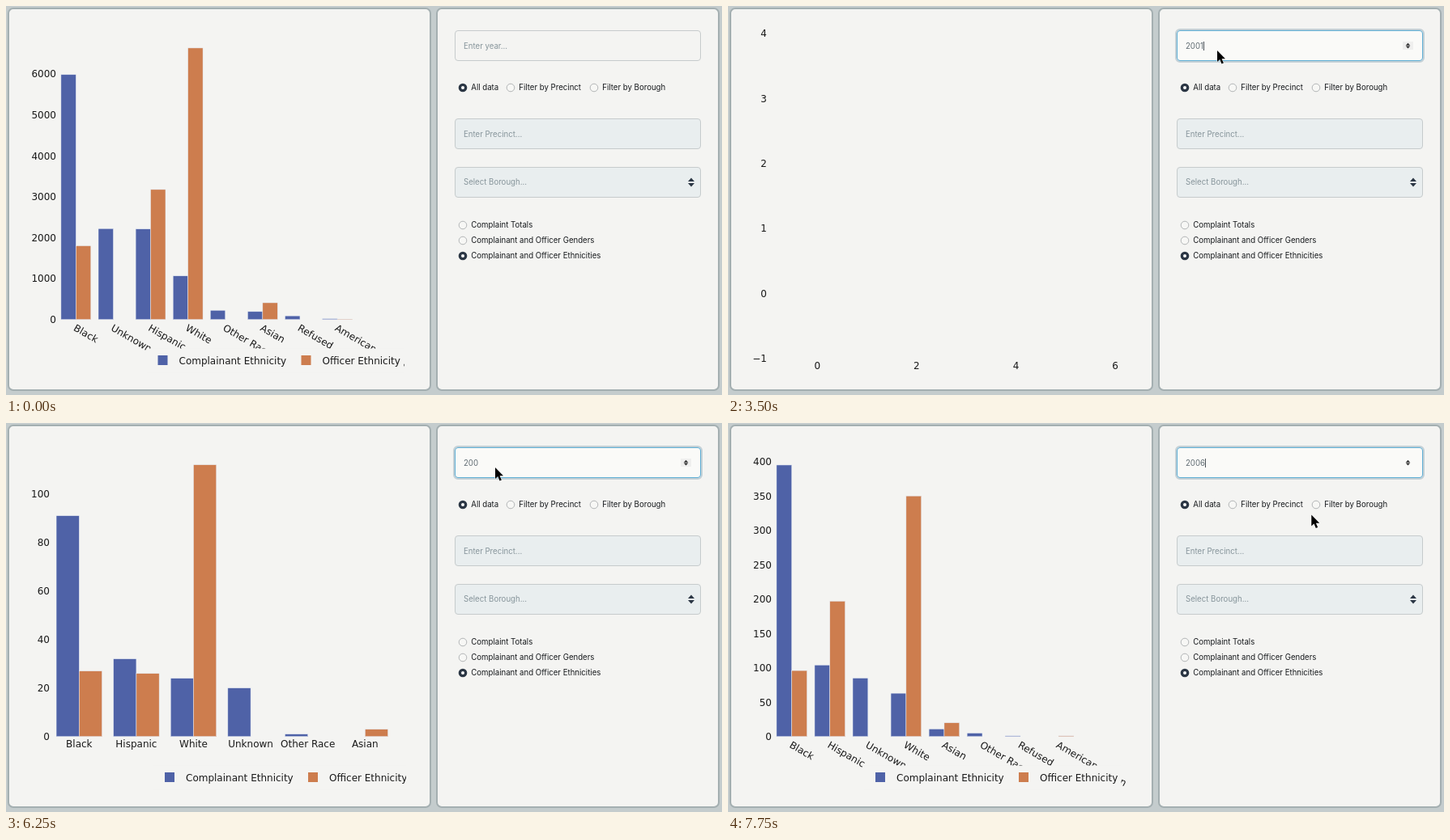
Write an HTML page that moves like this. It is 884 px wide and 481 px high and loops after 8000 ms.

```html
<!DOCTYPE html>
<html lang="en">
<head>
<meta charset="utf-8">
<title>Complaint chart</title>
<style>
  html, body { margin: 0; width: 100%; height: 100%; overflow: hidden; background: #c4cccd; }
  svg { display: block; }
  .panel { fill: #f4f4f2; stroke: #a4afb1; stroke-width: 2; }
  .chart text { font: 12px "DejaVu Sans", Verdana, sans-serif; fill: #1a1a1a; }
  .form text { font: 9.65px Inter, sans-serif; fill: #16191c; }
  .form .hint { fill: #86949a; }
  .form .typed { fill: #5f6b72; }
  .bar { stroke: #e5ecf6; stroke-width: .5; }
  .field { fill: #f4f4f2; stroke: #c6cbcc; }
  .disabled { fill: #e9eeef; }
  .dark { fill: #2b3644; }
</style>
</head>
<body>
<svg id="stage" width="884" height="481" viewBox="0 0 884 481"></svg>
<script>
const BLUE = '#4f62a7', ORANGE = '#cd7d4e', BASE = 387.7;
const stage = document.getElementById('stage');

const rect = (x, y, w, h, attrs = '') => `<rect x="${x}" y="${y}" width="${w}" height="${h}" ${attrs}/>`;
const text = (x, y, label, attrs = '') => `<text x="${x}" y="${y}" ${attrs}>${label}</text>`;
const path = (d, attrs = '') => `<path d="${d}" ${attrs}/>`;
const RIGHT = 'text-anchor="end"', MIDDLE = 'text-anchor="middle"';

function legend(left) {
  const item = (x, color, label) => rect(x + 14, 432, 12, 12, `fill="${color}"`) + text(x + 40, 443, label);
  return rect(left, 423.5, 317.5, 30, 'fill="#f4f4f2"') +
    item(left, BLUE, 'Complainant Ethnicity') + item(left + 177, ORANGE, 'Officer Ethnicity');
}

// Each data row is [category, complainants, officers].
function barChart({ id, left, step, unit, tick, ticks, tickX, legendX, tilted, data }) {
  let out = '';
  for (let i = 0; i <= ticks; i++)
    out += text(tickX, BASE - i * tick * unit + 4.4, i * tick, RIGHT);
  data.forEach(([label, ...values], i) => {
    const center = left + step * (i + .5), width = step * .4;
    values.forEach((value, k) => {
      if (value) out += rect(center + (k - 1) * width, BASE - value * unit, width, value * unit,
        `class="bar" fill="${k ? ORANGE : BLUE}"`);
    });
    out += tilted
      ? text(0, 0, label, `transform="translate(${center - 3.8} 400.5) rotate(30)"`)
      : text(center, 401.2, label, MIDDLE);
  });
  return `<g id="${id}" clip-path="url(#plot)">${out}${legend(legendX)}</g>`;
}

function emptyChart() {
  let out = '';
  for (let v = -1; v <= 4; v++)
    out += text(48, 359.7 - v * 80.4, v < 0 ? '−1' : v, RIGHT);
  for (let v = 0; v <= 6; v += 2)
    out += text(110.3 + v * 61.3, 449, v, MIDDLE);
  return `<g id="empty">${out}</g>`;
}

const radio = (x, y, label, on) =>
  (on ? `<circle cx="${x}" cy="${y}" r="5.3" class="dark"/><circle cx="${x}" cy="${y}" r="2" fill="#fff"/>`
      : `<circle cx="${x}" cy="${y}" r="4.8" fill="#f7f7f5" stroke="#b3b6b7"/>`) +
  text(x + 10.3, y + 3.4, label);

const field = (y, cls = '') => rect(554.5, y + .5, 303, 37, `rx="3.5" class="field ${cls}"`);
const hint = (y, label, id = '') => text(565, y, label, `class="hint" ${id}`);

stage.innerHTML =
  '<clipPath id="plot"><rect x="20" y="20" width="474" height="440"/></clipPath>' +
  rect(3, 3, 521, 472, 'rx="6" class="panel"') + rect(532, 3, 348, 472, 'rx="6" class="panel"') +
  '<g class="chart">' +
  barChart({
    id: 'all', left: 63.3, step: 46.1, unit: .05065, tick: 1000, ticks: 6, tickX: 62, legendX: 173.5, tilted: true,
    data: [['Black', 5980, 1800], ['Unknown', 2220, 0], ['Hispanic', 2210, 3175], ['White', 1065, 6630],
      ['Other Race', 225, 0], ['Asian', 195, 410], ['Refused', 90, 0], ['American Indian', 20, 10]]
  }) +
  barChart({
    id: 'y2001', left: 55, step: 70.6, unit: 3, tick: 20, ticks: 5, tickX: 54, legendX: 182,
    data: [['Black', 91, 27], ['Hispanic', 32, 26], ['White', 24, 112], ['Unknown', 20, 0],
      ['Other Race', 1, 0], ['Asian', 0, 3]]
  }) +
  barChart({
    id: 'y2006', left: 55.2, step: 47.05, unit: .85, tick: 50, ticks: 8, tickX: 54, legendX: 168, tilted: true,
    data: [['Black', 395, 96], ['Hispanic', 104, 197], ['Unknown', 85, 0], ['White', 63, 350],
      ['Asian', 11, 20], ['Other Race', 5, 0], ['Refused', 1, 0], ['American Indian', 0, 1]]
  }) +
  emptyChart() + '</g><g class="form">' +
  field(30) +
  '<g id="focus">' + rect(553, 29, 306, 40, 'rx="5" fill="none" stroke="#c3d0d6" stroke-width="2"') +
  rect(554.5, 30.5, 303, 37, 'rx="3.5" fill="#fafaf8" stroke="#5fafd6"') +
  rect(833, 44, 13, 10, 'id="spinner" fill="#efefee"') +
  path('M836.7 48.7L839.5 45.7L842.3 48.7ZM836.7 49.5L839.5 52.5L842.3 49.5Z', 'fill="#333"') + '</g>' +
  hint(53, 'Enter year...', 'id="yearHint"') + text(565, 53, '', 'id="year" class="typed"') +
  rect(0, 44, 1, 11, 'id="caret" fill="#4a5258"') +
  radio(564, 101, 'All data', true) + radio(623, 101, 'Filter by Precinct') + radio(726, 101, 'Filter by Borough') +
  field(139, 'disabled') + hint(162, 'Enter Precinct...') +
  field(199, 'disabled') + hint(221.3, 'Select Borough...') +
  path('M842 217L846 212.5L850 217ZM842 219L846 223.5L850 219Z', 'class="dark"') +
  radio(564, 271, 'Complaint Totals') + radio(564, 290, 'Complainant and Officer Genders') +
  radio(564, 309, 'Complainant and Officer Ethnicities', true) + '</g>' +
  path('M0 0V14L3.2 11.1L5.5 16.6L7.9 15.6L5.6 10.2H10Z',
    'id="pointer" fill="#000" stroke="#fff" stroke-width="1" paint-order="stroke"');

// Tracks of [start time in ms, value]; values hold until the next entry.
const tracks = {
  chart: [[0, 'all'], [3000, 'empty'], [3750, 'y2001'], [6500, 'empty'], [7000, 'y2006']],
  typed: [[0, ''], [2750, '20'], [3250, '200'], [3500, '2001'], [6250, '200'], [6500, '2006']],
  caret: [[0, 0], [1250, 1], [1750, 0], [2000, 1], [4000, 0], [4500, 1], [5000, 0], [5500, 1],
    [6000, 0], [6500, 1], [7000, 0], [7500, 1]],
  pointer: [[0, null], [750, [591.5, 49.5]], [1000, [604, 41.5]], [1500, [604, 55]],
    [7500, [690, 94]], [7750, [720.3, 113.5]]]
};
const caretX = { '': 565, 20: 577, 200: 583, 2001: 587, 2006: 589 };

const at = (name, t) => tracks[name].findLast(([start]) => start <= t)[1];
const $ = id => document.getElementById(id);
const show = (id, on) => $(id).setAttribute('visibility', on ? 'visible' : 'hidden');

function render(t) {
  const chart = at('chart', t), typed = at('typed', t), pos = at('pointer', t);
  for (const id of ['all', 'y2001', 'y2006', 'empty']) show(id, id === chart);
  $('focus').style.display = t >= 1250 ? '' : 'none';
  $('spinner').style.display = t < 7500 ? '' : 'none';
  show('yearHint', !typed);
  $('year').textContent = typed;
  $('caret').setAttribute('x', caretX[typed]);
  show('caret', at('caret', t));
  show('pointer', pos);
  if (pos) $('pointer').setAttribute('transform', `translate(${pos})`);
}

const began = performance.now();
function tick() {
  render((performance.now() - began) % 8000);
  requestAnimationFrame(tick);
}
tick();
</script>
</body>
</html>
```
